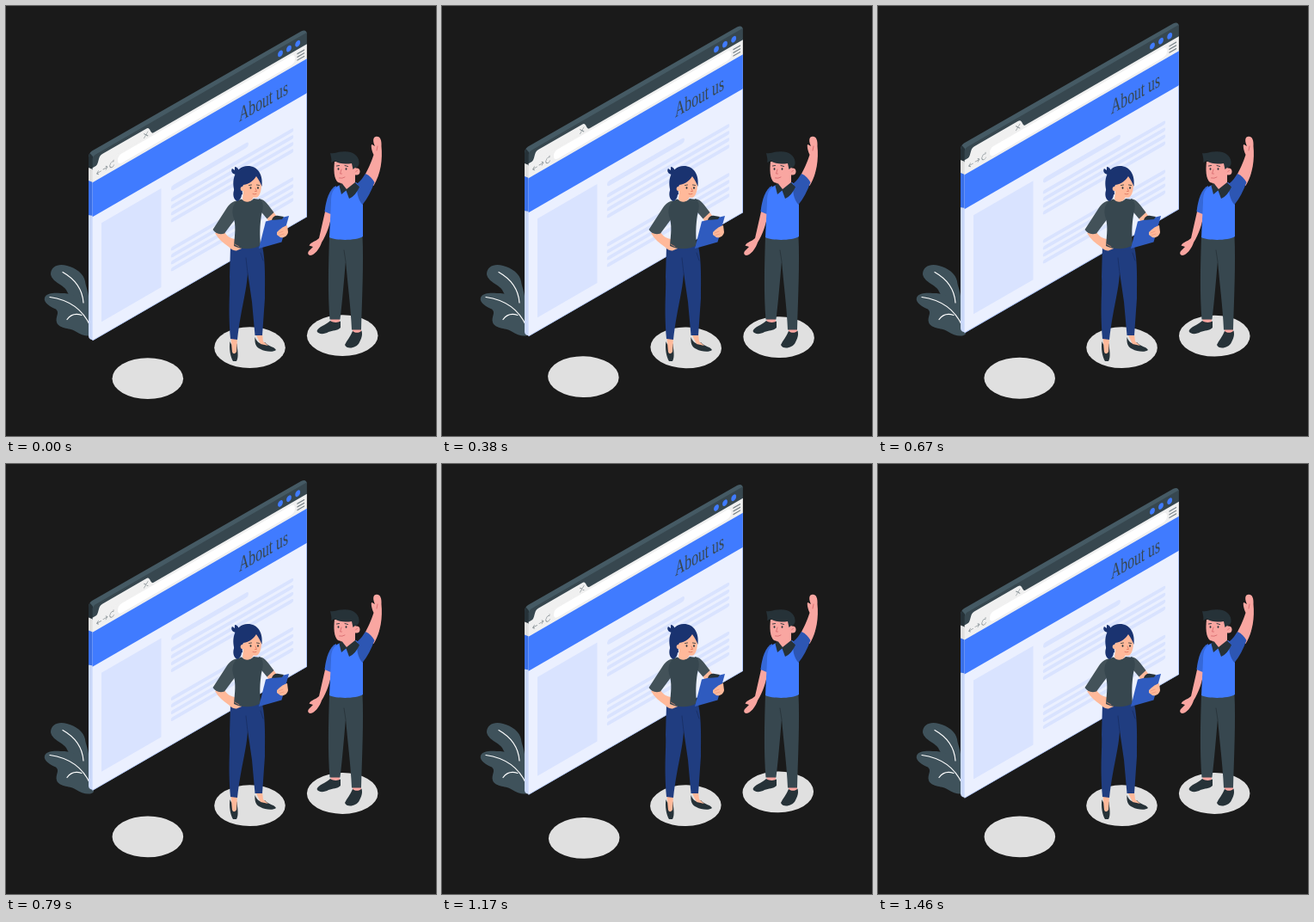
Animation, 500 px wide and 500 px high, one loop 1.5 s. Source, as an HTML page:

```html
<!DOCTYPE html>
<html lang="en">
<head>
<meta charset="utf-8">
<title>About us</title>
<style>
  html, body { margin: 0; width: 100%; height: 100%; overflow: hidden; background: #1a1a1a; }
  svg { display: block; width: 100vw; height: 100vh; }
  .title { font: 24.5px "Liberation Serif", "Times New Roman", serif; fill: #37474f; }
  .blue { fill: #407bff; }
  .slate { fill: #37474f; }
  .sleeve { fill: #435259; }
  .dark { fill: #263238; }
  .navy { fill: #203d80; }
  .leaf { fill: #3f525b; }
  .peach { fill: #ffb99a; }
  .pink { fill: #f9a6a1; }
  .line { fill: none; stroke-linecap: round; stroke-linejoin: round; }
</style>
</head>
<body>
<svg viewBox="0 0 500 500">
  <g id="discs" fill="#e0e0e0">
    <ellipse cx="164.8" cy="433.2" rx="41.3" ry="23.9"/>
    <ellipse cx="283.5" cy="397.2" rx="41.3" ry="23.9"/>
    <ellipse cx="391.2" cy="383.2" rx="41.3" ry="23.9"/>
  </g>

  <g id="plant">
    <path class="leaf" d="M52 312C52 302 62 299 71 302C82 305 90 311 92 320C93 328 97 333 97 350L98 372L84 350C76 340 74 338 71 332C68 324 54 322 52 312Z"/>
    <path class="leaf" d="M45 339C48 332 60 334 68 334C82 335 92 343 97 354L102 381C98 386 88 383 82 379C76 374 62 376 59 368C57 361 63 357 58 352.500C52 350 43 345 45 339Z"/>
    <g class="line" stroke="#fff" stroke-width="1.2">
      <path d="M66 309.500C81 318 89 331 90 345"/>
      <path d="M51 338.500C69 341 88 350 98 372"/>
      <path d="M71 364.500C75 359 81 357 88 359.500"/>
    </g>
  </g>

  <g id="win">
    <path fill="#455a64" d="M96 190V176Q96 171 100 168.500L343 29.500Q349 26.500 349.900 32L102 176V190Z"/>
    <path class="dark" d="M96 189V176Q96 173 97.500 171L101 175V191Z"/>
    <path fill="#e0e0e0" d="M96 188L101 190V207L96 204Z"/>
    <path fill="#3a70e8" d="M96 203L101 205V245L96 243Z"/>
    <path fill="#cad8fa" d="M96 243L101 244V388.500L98 387.500Q96 386 96 384Z"/>
    <!-- front face, sheared into the isometric plane -->
    <g transform="matrix(1 -.5774 0 1 0 58.750)">
      <path class="slate" d="M100.600 190V177Q101 174 104 174H349.900V190Z"/>
      <rect x="100.600" y="187.500" width="249.300" height="18" fill="#f0f0f0"/>
      <path fill="#f0f0f0" d="M103 188.500C109 188 106 178 112 178H163C168.500 178 167 188 173 188.500Z"/>
      <rect x="130" y="190.500" width="206" height="11" rx="5" fill="#fff"/>
      <rect x="100.600" y="204.500" width="249.300" height="184" fill="#ebf0ff"/>
      <rect class="blue" x="100.600" y="204.500" width="249.300" height="40"/>
      <rect x="111" y="257.500" width="69.500" height="115" fill="#d9e3ff"/>
      <path class="line" stroke="#a9c2ff" stroke-width=".8" d="M101 388.200H349.500V245"/>
      <g id="rows" class="line" stroke="#d9e3ff"></g>
      <g class="blue">
        <ellipse cx="319" cy="180.800" rx="2.900" ry="3.500"/>
        <ellipse cx="329" cy="180.800" rx="2.900" ry="3.500"/>
        <ellipse cx="339.200" cy="180.800" rx="2.900" ry="3.500"/>
      </g>
      <path class="line" stroke="#7a8489" stroke-width="1.400" d="M339 192.500H346.500M339 196.200H346.500M339 199.900H346.500"/>
      <path class="line" stroke="#8d969a" stroke-width=".8" d="M160.500 182.500L165 187.500M165 182.500L160.500 187.500M110.500 197H105.500M107.500 195L105.500 197L107.500 199M113 196.500H118M116 194.500L118 196.500L116 198.500M125.500 198.500A2.500 3.200 0 1 1 125 194.300V192.500"/>
      <text class="title" transform="translate(271 232.600) scale(.64 1)">About us</text>
    </g>
  </g>

  <g id="woman">
    <path class="dark" d="M260.500 390C262 396 268 396 268.500 392C269 400 271 408 268 413H264C261 408 259 398 260.500 390ZM289.500 385C293 394 298 393 301 391C305 396 312 396 314 400C311 403 301 402 296 399C290 397 289 391 289.500 385Z"/>
    <path class="peach" d="M261.500 386H269L268 402C266 405 264 405 263 402ZM290 381H298L299 390L305 395L296 393Z"/>
    <path class="navy" d="M261 279H298C302 297 301 320 301 340L298 383H289.500L286 344L281 310C280 332 273 352 269 388L261 387C258 350 261 330 260 315Z"/>
    <path class="line" stroke="#182e63" stroke-width=".8" d="M281 311L279 293M296 287L299 296"/>
    <path class="peach" d="M243 264L253 261C256 267 260 270 266 271C271 273 274 277 274 282L268 284.500C264 285 261 282 259 280C253 276 247 271 243 264ZM302 243L309 237L316 246L306 253Z"/>
    <path class="sleeve" d="M270 226C263 227 259 231 256 236L240.500 260C243 264 248 266.500 254 264.500L267 247ZM294 224C302 225 305 232 311.500 240L303.500 247.500L294 236Z"/>
    <path class="slate" d="M273.500 224.500C279 228 285 228 288 224L296 225C300 229 299 236 297 243C295 256 295 266 296 278C288 284 272 283 265 279C266 266 268 255 264 244C262 235 265 227 273.500 224.500Z"/>
    <path fill="#1a3370" d="M266 212C263 218 264 225 269 227C274 225 275 219 273 213Z"/>
    <path class="peach" d="M276 214L287 217V224C284 229 277 228.500 275 225Z"/>
    <path class="peach" d="M275 196H296C298 209 297 219 292 222.500C286 224 279 220 276 216Z"/>
    <g fill="#1a3370">
      <path d="M267 196C263 195 261 192 263 189L266 191L266 187C269 187 271 190 271 194Z"/>
      <path d="M266 216C262 204 265 187 281 186C293 186 299 196 297.500 210C296 206 294 202 291 198C288 203 283 207 276 208C274 212 275 216 275 219C271 221 268 220 266 216Z"/>
    </g>
    <circle class="peach" cx="275.500" cy="212.500" r="2.800"/>
    <g class="dark">
      <ellipse cx="284.500" cy="211.500" rx=".9" ry="1.200"/>
      <ellipse cx="293" cy="211.500" rx=".9" ry="1.200"/>
    </g>
    <path class="line" stroke="#263238" stroke-width=".8" d="M282.500 208.500L285.500 208M291.500 208L294.500 208.500"/>
    <path class="line" stroke="#e07a64" stroke-width=".9" d="M290 212L291.500 215.500H289.500M287 218.500Q289 219.500 291 218.500"/>
    <path fill="#2f5bbf" d="M302 250.500L329 244L320.500 274.500L294 282Z"/>
    <path class="dark" d="M309 249C310 245 313 243 317 244L323 245L321 248Z"/>
    <path class="peach" d="M315 263C318 260 321 257 327 255L328 263C327 268 323 270 319 269L315 266Z"/>
    <path class="line" stroke="#eb9377" stroke-width=".7" d="M317 264L322 262M318 266.500L323 265M266 277L271 280"/>
  </g>

  <g id="man">
    <path class="pink" d="M377 361H388V370H378ZM403 374H413V382H403Z"/>
    <path class="dark" d="M361.500 378C363 373 372 371 377 366C382 369 386 368 389 366.500V374C385 378 380 377 375 379C370 382 363 382 361.500 378ZM394 394C396 389 401 384 403 378C407 381 411 380 413.500 377.500C415 383 413 387 411 391C408 398 396 400 394 394Z"/>
    <path class="slate" d="M376 267H414.500C416 300 414 340 413 376.500H402C401 350 397 322 395 296C393 320 391 344 388.500 364.500H376.500C374 334 375 300 376 267Z"/>
    <path class="line" stroke="#263238" stroke-width=".8" d="M395 297L393 284"/>
    <path class="pink" d="M371.500 237L379 240C377 254 373 265 367 275C365 281 361 287 356 289.500C352 291 350 288 352 285L357 280L352.500 278.500C355 274 360 274 364 270Z"/>
    <path class="pink" d="M415 201C421 190 425 181 427.500 173C425 168 424 161 425.500 161L429 163C426 157 427 152 430 152C435 151 437 156 436.500 163C438 178 436 195 427.500 209Z"/>
    <path fill="#3568d8" d="M384 209C376 212 372 226 370.500 239L377.500 242L384 232Z"/>
    <path class="blue" d="M389 208L407 205L415 212V268C407 273 384 273 376 269L378 228C378 218 380 211 389 208Z"/>
    <path fill="#2d56b3" d="M409 206C413 203 415 199 418 195C423 197 426 201 428.500 205C425 215 420 224 414.500 231C409 225 407 215 409 206Z"/>
    <path class="pink" d="M389 200L406 197L406 208C402 214 394 215 390 210Z"/>
    <path class="dark" d="M387.500 209L390.500 206L396 213L406 205L411 210.500C408 217 404 222 399 224L395.500 214.500L390 219Z"/>
    <path class="pink" d="M382 181H407L406 198C402 205 392 208 386 205C381 201 381 190 382 181Z"/>
    <circle class="pink" cx="407.500" cy="192.500" r="4"/>
    <path class="dark" d="M378 182C379 179 378 176 377 171C382 172 386 169 391 169.500C401 168 410 173 410.500 181C411 185 409 188 406 188L403.500 190L402 183C395 184 388 184 382 180Z"/>
    <g class="dark">
      <ellipse cx="386.500" cy="189.500" rx=".9" ry="1.300"/>
      <ellipse cx="395.500" cy="189.500" rx=".9" ry="1.300"/>
    </g>
    <path class="line" stroke="#263238" stroke-width=".9" d="M384.500 186L387.500 185.500M394 185.500L397.500 186.500"/>
    <path class="line" stroke="#d96d70" stroke-width=".9" d="M390 190L388.500 195H390.500M387.500 200Q391 201 394 199M406.500 193L408.500 191M432 163L431 168"/>
  </g>
</svg>
<script>
  const LOOP = 1500, STEP = 1000 / 24;
  const $ = id => document.getElementById(id);

  const row = (x1, x2, y, w) =>
    `<path stroke-width="${w}" d="M${x1} ${y}H${x2}"/>`;
  let rows = row(195, 279, 264.5, 6);
  for (const top of [278, 335])
    for (let i = 0; i < 4; i++) rows += row(194, 332, top + 8 * i, 4.5);
  $("rows").innerHTML = rows;

  // Linear interpolation through [time, value] keys.
  function track(keys, p) {
    const i = Math.max(1, keys.findIndex(k => k[0] >= p));
    const [t0, a] = keys[i - 1], [t1, b] = keys[i];
    return a + (b - a) * (p - t0) / (t1 - t0);
  }
  const lift = [[0, 0], [0.5, -10], [1, 0]];
  const sway = [[0, 0], [0.25, 1], [0.75, -1], [1, 0]];

  const start = performance.now();
  function draw(now) {
    const t = Math.max(0, now - start) % LOOP;
    const p = Math.floor((t + 3.5) / STEP) * STEP / LOOP % 1;
    $("win").setAttribute("transform", `translate(0 ${track(lift, p)})`);
    $("discs").setAttribute("transform", `rotate(${track(sway, p)} 278.2 408.2)`);
    requestAnimationFrame(draw);
  }
  draw(start);
</script>
</body>
</html>
```
